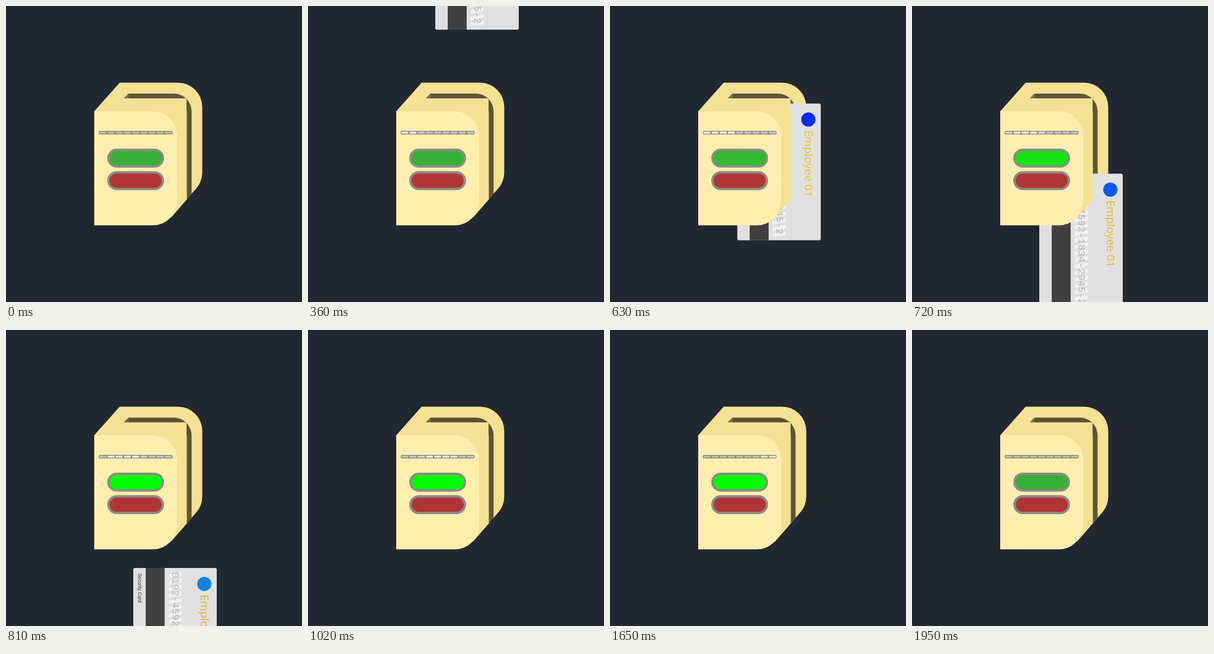
An HTML page for the animation above (2.13 s loop, 500 px wide and 500 px high).

```html
<!DOCTYPE html>
<html lang="en">
<head>
<meta charset="utf-8">
<title>Card reader</title>
<style>
html, body { margin: 0; width: 100%; height: 100%; overflow: hidden; background: #222831; }
svg { display: block; width: 100vw; height: 100vh; }
.number { font: 17px "Liberation Mono", monospace; fill: #b4b4b4; }
.label { font: 8.2px "Liberation Sans", sans-serif; fill: #333; }
.name { font: 19px "Open Sans", sans-serif; }
.button { stroke: #8c8a86; stroke-width: 4; }
</style>
</head>
<body>
<svg viewBox="0 0 500 500">
  <defs>
    <pattern id="stripes" width="22" height="11" patternUnits="userSpaceOnUse" patternTransform="translate(60 7)">
      <path d="M0 4 22 0V6L0 10Z" fill="#f3f3f3"/>
    </pattern>
  </defs>

  <!-- Back of the reader and its slot -->
  <path fill="#f4e194" d="M149 178 192 129.500H290.500A41 41 0 0 1 331.500 170.500V281A41 41 0 0 1 321.500 308L279 357Z"/>
  <path fill="#5c5435" d="M199 156 207 148H283.500A30 30 0 0 1 313.500 178V317.500L305 327V156Z"/>
  <path fill="#7b7148" d="M199 156 207 148V156Z"/>

  <g id="card">
    <rect width="141" height="231" rx="3" fill="#e0e0e0"/>
    <rect x="21" width="32" height="231" fill="#404040"/>
    <rect x="60" y="7" width="22" height="217" fill="url(#stripes)"/>
    <text class="label" transform="translate(7.500 9) rotate(90)">Security Card</text>
    <text class="number" transform="translate(66 7) rotate(90)">0192-4592-1834-2945-2</text>
    <circle id="badge" cx="120" cy="27" r="12"/>
    <text id="name" class="name" transform="translate(113.500 45) rotate(90)">Employee 01</text>
  </g>

  <!-- Front of the reader -->
  <path fill="#f4e194" d="M149 178 169 156H280.500A25 25 0 0 1 305.500 181V326.500L279 357 200 300Z"/>
  <path fill="#ffeeae" d="M149 178H248A41 41 0 0 1 289 219V329.500A41 41 0 0 1 248 370.500H149Z"/>
  <rect x="156.500" y="211" width="125" height="6" rx="2.500" fill="#8c8a86"/>
  <g id="lights"></g>
  <rect id="green" class="button" x="173" y="243" width="92" height="28" rx="14"/>
  <rect class="button" x="173" y="281" width="92" height="28" rx="14" fill="#b03535"/>
</svg>
<script>
const LOOP = 2130, STEP = 30, END = 1950, COUNT = 9, SWEEP = 1320;
const get = id => document.getElementById(id);
const clamp = v => Math.max(0, Math.min(1, v));
const mix = (a, b, k) => a.map((v, i) => v + (b[i] - v) * k);
const paint = (el, c) => el.setAttribute('fill', `rgb(${c.map(Math.round)})`);

const card = get('card'), badge = get('badge'), nameText = get('name'), green = get('green');
const lights = Array.from({ length: COUNT }, (_, i) => {
  const el = document.createElementNS('http://www.w3.org/2000/svg', 'rect');
  const attrs = { x: 157.8 + i * 13.85, y: 212.4, width: 11.6, height: 3.2, rx: 1.2 };
  for (const key in attrs) el.setAttribute(key, attrs[key]);
  return get('lights').appendChild(el);
});

function draw(t) {
  card.setAttribute('transform', `translate(215 ${-191 + (t - 360) * 1.3175})`);

  const shift = clamp((t - 630) / 180);
  paint(badge, mix([0, 40, 255], [16, 133, 220], shift));
  paint(nameText, mix([230, 194, 30], [230, 172, 30], shift));

  // A lit window runs along the strip while its tint cools and warms again.
  const cool = clamp(Math.min(t / 300, (1650 - t) / 600));
  const off = mix([208, 195, 145], [200, 200, 200], cool);
  const on = mix([255, 240, 180], [255, 255, 255], cool);
  const head = (t - 40) / SWEEP * COUNT;
  const tail = (t - 630) / SWEEP * COUNT;
  lights.forEach((el, i) => paint(el, mix(off, on, clamp(head - i) - clamp(tail - i))));

  const glow = Math.min(clamp((t - 610) / 170), clamp((END - t) / 270));
  paint(green, mix([56, 176, 56], [0, 255, 0], glow));
}

const start = performance.now();
function tick() {
  const t = (performance.now() - start) % LOOP;
  draw(Math.min(Math.floor(t / STEP) * STEP, END));
  requestAnimationFrame(tick);
}
tick();
</script>
</body>
</html>
```
